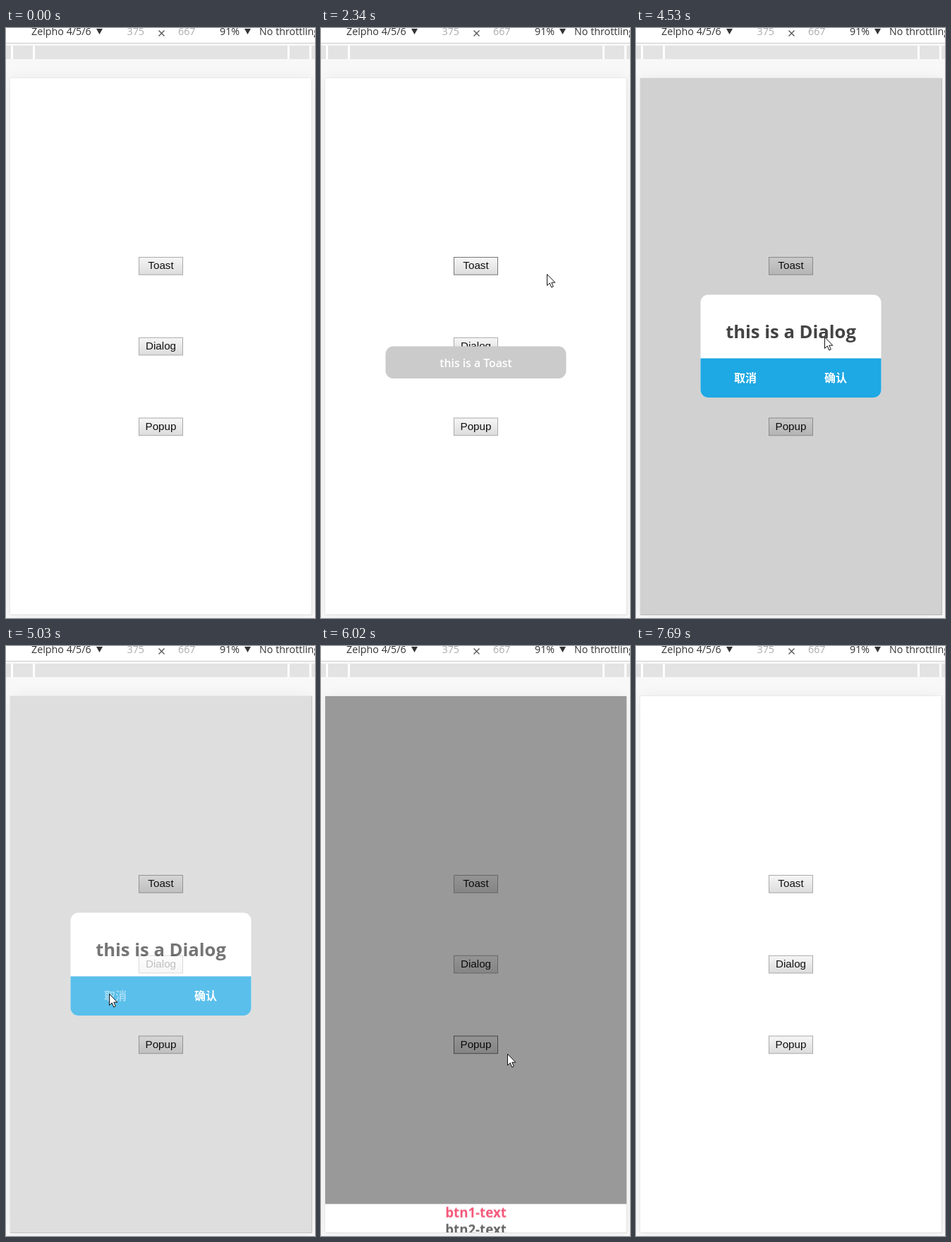
Animation, 438 px wide and 835 px high, one loop 8.25 s. Source, as an HTML page:

```html
<!DOCTYPE html>
<html lang="en">
<head>
<meta charset="utf-8">
<title>Toast, dialog and popup</title>
<style>
  html, body { margin: 0; width: 100%; height: 100%; overflow: hidden; background: #f8f8f8; }
  svg { display: block; }
  .page { position: absolute; left: 6px; top: 71px; width: 427px; height: 759px; background: #fff;
    box-shadow: 0 0 0 .5px #e2e2e2, 1px 1px 0 #dedede, 0 0 20px rgba(0, 0, 0, .06); }
  .stage { position: absolute; left: 0; top: 0; }
  text { font-family: "Open Sans", "Noto Sans", sans-serif; }
  .bar text { font-size: 14.3px; fill: #333; }
  .bar .soft { fill: #aaa; }
  .button rect { fill: url(#face); stroke: #a9a9a9; }
  .button text { font: 15.2px "Liberation Sans", Arial, sans-serif; fill: #111; }
  .button text, .mid, .choice, .item { text-anchor: middle; }
  .choice { font: 700 16px "Noto Sans CJK SC", "Noto Sans CJK", sans-serif; fill: #fff; }
  .item { font-size: 18.7px; font-weight: 700; fill: #666; }
  .item:first-of-type { fill: #f5587b; }
  #toast, #dialog, #mask, #cursor { opacity: 0; }
</style>
</head>
<body>
<div class="page"></div>
<svg class="stage" width="438" height="835" viewBox="0 0 438 835">
  <defs>
    <linearGradient id="face" x2="0" y2="1">
      <stop stop-color="#f6f6f6"/><stop offset="1" stop-color="#dcdcdc"/>
    </linearGradient>
    <clipPath id="screen"><rect x="6" y="71" width="427" height="759"/></clipPath>
    <clipPath id="panel"><rect x="91.5" y="377.5" width="256" height="145.5" rx="11"/></clipPath>
  </defs>

  <g class="bar">
    <rect width="438" height="21" fill="#fff"/>
    <rect y="21" width="438" height="1" fill="#ccc"/>
    <rect y="25" width="438" height="19" fill="#e3e3e3"/>
    <g id="gaps" fill="#fff"></g>
    <text x="36" y="10">Zelpho 4/5/6</text>
    <text x="171.5" y="10" class="soft">375</text>
    <text x="244" y="10" class="soft">667</text>
    <text x="303" y="10">91%</text>
    <text x="359" y="10">No throttling</text>
    <path d="M128 1h9l-4.5 8zM338 1h9l-4.5 8z" fill="#333"/>
    <path d="M216.5 3.5l8 8m0-8l-8 8" stroke="#555" stroke-width="1.3"/>
  </g>

  <g id="buttons"></g>

  <g id="toast">
    <rect x="91.5" y="450.5" width="256" height="45.5" rx="11" fill="#cbcbcb"/>
    <text class="mid" x="219.5" y="480" font-size="15.8" font-weight="600" fill="#fff">this is a Toast</text>
  </g>

  <g id="dialog">
    <rect x="6" y="71" width="428" height="760" fill="#000" fill-opacity=".18"/>
    <g clip-path="url(#panel)">
      <rect x="91" y="377" width="257" height="147" fill="#fff"/>
      <rect x="91" y="467.5" width="257" height="57" fill="#1ea8e4"/>
    </g>
    <text class="mid" x="219.5" y="439" font-size="25.6" font-weight="700" fill="#444">this is a Dialog</text>
    <text id="cancel" class="choice" x="155" y="501">取消</text>
    <text class="choice" x="283" y="501">确认</text>
  </g>

  <g clip-path="url(#screen)">
    <rect id="mask" x="6" y="71" width="427" height="759"/>
    <g id="popup"><rect x="6" y="830" width="427" height="73" fill="#fff"/></g>
  </g>

  <path id="cursor" d="M.5.5v16l3.7-3.5 2.5 6 2.6-1.1-2.5-5.7h5z" fill="#fff" stroke="#111"/>
</svg>

<script>
const LOOP = 8250, ITEM_HEIGHT = 24;
const find = id => document.getElementById(id);
const add = (id, markup) => {
  find(id).insertAdjacentHTML('beforeend', markup);
  return find(id).lastElementChild;
};

// Each step is [time in ms, value, easing towards the next step].
function track(el, property, steps) {
  const all = [[0, steps[0][1]], ...steps, [LOOP, steps.at(-1)[1]]];
  el.animate(
    all.map(([time, value, easing = 'linear']) => ({ offset: time / LOOP, [property]: value, easing })),
    { duration: LOOP, iterations: Infinity });
}

// Goes from off to on and back, each way taking the given time.
const pulse = (el, property, [off, on], start, end, time, easing) => track(el, property, [
  [start, off, easing], [start + time, on], [end, on, easing], [end + time, off]]);
const fade = (el, start, end) => pulse(el, 'opacity', [0, 1], start, end, 300, 'ease');
const toggle = (el, property, values, start, end) => pulse(el, property, values, start, end, 0);

// The pointer glides between these places and rests at each one.
const stop = (x, y, arrive, leave = arrive) => ({ x, y, arrive, leave });
const tour = {
  enter: stop(427, 784, 100),
  edge: stop(426, 669, 300, 480),
  toast: stop(224, 340, 980, 1270),
  watch: stop(320, 348, 1550, 2340),
  dialog: stop(215, 450, 3220, 3450),
  title: stop(267, 437, 3570, 4530),
  cancel: stop(146, 492, 4960, 5040),
  popup: stop(250, 573, 5600, 5900),
  below: stop(264, 577, 6020, 6310),
  items: stop(300, 781, 6600, 6700),
  outside: stop(314, 355, 7060, 7520),
  exit: stop(385, 573, 7685),
};
track(find('cursor'), 'transform', Object.values(tour).flatMap(({ x, y, arrive, leave }) => {
  const place = `translate(${x}px, ${y}px)`;
  return [[arrive, place], [leave, place, 'ease-in-out']];
}));
toggle(find('cursor'), 'opacity', [0, 1], tour.enter.arrive, tour.exit.arrive);

for (const x of [7, 38]) for (const left of [x, 437 - x - 3 + 3])
  add('gaps', `<rect x="${left}" y="25" width="3" height="19"/>`);

// A button keeps its darker border until the next part of the tour.
const focus = [[tour.toast, tour.dialog], [tour.dialog, tour.cancel], [tour.popup, tour.below]];
['Toast', 'Dialog', 'Popup'].forEach((label, i) => {
  const top = 324 + i * 113.75;
  const button = add('buttons', `<g class="button">
    <rect x="188.5" y="${top + .5}" width="62" height="24.7"/>
    <text x="219.5" y="${Math.round(top + 17)}">${label}</text></g>`);
  const [from, to] = focus[i];
  toggle(button.firstElementChild, 'stroke', ['#a9a9a9', '#757575'], from.arrive, to.leave);
});

for (const i of [0, 1, 2])
  add('popup', `<text class="item" x="219.5" y="${849 + i * ITEM_HEIGHT}">btn${i + 1}-text</text>`);

fade(find('toast'), tour.toast.leave, 2750);
fade(find('dialog'), tour.dialog.leave, 4975);
toggle(find('cancel'), 'opacity', [1, .45], tour.cancel.arrive, 5330);
toggle(find('mask'), 'opacity', [0, .4], tour.popup.leave, 7405);
pulse(find('popup'), 'transform', ['translateY(0)', `translateY(${-3 * ITEM_HEIGHT}px)`],
  tour.popup.leave + 9, 7201, 200);
</script>
</body>
</html>
```
